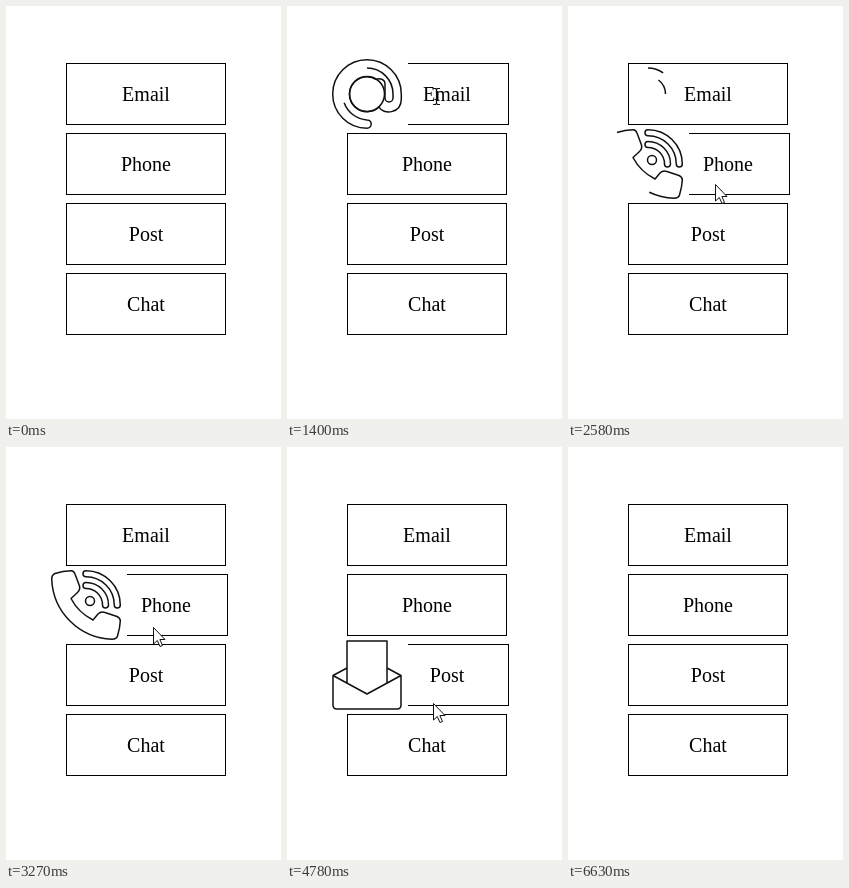
Recreate the animation shown at these times as an HTML page. Size 275x413 px, loop 6.83 s.

```html
<!DOCTYPE html>
<html lang="en">
<head>
<meta charset="utf-8">
<title>Contact buttons</title>
<style>
  html, body { margin: 0; width: 100%; height: 100%; overflow: hidden; background: #fff; }
  svg { display: block; width: 275px; height: 413px; }
  text { font: 20px "Liberation Serif", "Times New Roman", Times, serif; text-anchor: middle; }
  .frame { fill: none; stroke: #000; shape-rendering: crispEdges; }
  .icon { fill: none; stroke: #111; stroke-width: 1.5; stroke-linejoin: round; }
</style>
</head>
<body>
<svg id="stage" viewBox="0 0 275 413"></svg>
<script>
const LOOP = 6830;
const SLIDE = 500, DRAW_DELAY = 380, DRAW = 600;

// Each icon is a list of strokes in a 70 by 70 box.
const band = (outer, inner) => {
  const cap = (outer - inner) / 2;
  return `M35 ${35 - outer}A${outer} ${outer} 0 0 1 ${35 + outer} 35` +
    `a${cap} ${cap} 0 0 1 ${-2 * cap} 0A${inner} ${inner} 0 0 0 35 ${35 - inner}` +
    `a${cap} ${cap} 0 0 1 0 ${-2 * cap}`;
};

const rows = [
  { label: "Email", enter: 710, leave: 2010, undraw: 750, icon: [
    "M35 9A26 26 0 0 1 61 35V39a4 4 0 0 1-8 0V25c0-5-6-6-8.5-4.5A17.5 17.5 0 1 0 47 48" +
    "C51 56 69.3 55 69.3 40V35A34.3 34.3 0 1 0 35 69.3a4.2 4.2 0 0 0 0-8.4A26 26 0 0 1 35 9",
    "M52.5 35a17.5 17.5 0 1 0-35 0a17.5 17.5 0 1 0 35 0"] },
  { label: "Phone", enter: 2010, leave: 3360, undraw: 390, icon: [
    "M4 3.5Q12 .7 20 .7Q23 .7 24 4L28.5 16Q29.5 20 26 23L20 28.5C25 38 32 45 42 50" +
    "L47 44Q50 41 54 42.5L66 46.5Q69.3 48 69.3 51Q69 58 66.5 66Q65.5 69.3 61 69.3" +
    "C28 68 2 42 .7 9Q.7 5 4 3.5",
    band(34.3, 28.3), band(22.5, 16.5),
    "M43.5 31a4.5 4.5 0 1 0-9 0a4.5 4.5 0 1 0 9 0"] },
  { label: "Post", enter: 3360, leave: 4790, undraw: 500, icon: [
    "M15 28L1 35.5V65Q1 69 5 69H65Q69 69 69 65V35.5L35 54L1 35.5L15 28V43V1H55V43V28L69 35.5"] },
  { label: "Chat", enter: 4820, leave: 6070, undraw: 500, icon: [
    "M69.3 33C69.3 16 54 4.7 35 4.7S.7 16 .7 33C.7 40 3 45 7 49C6 55 0 58 1 65" +
    "C8 66 15 62 21 58.5C26 60.5 31 61.3 37 61.3C55 61 69.3 49 69.3 33"] }
];

// Pointer stops: time, x, y
const stops = [
  [720, 170, 106], [860, 149, 90], [1940, 149, 90], [2020, 149, 130], [2230, 147, 186],
  [2440, 147, 178], [3260, 147, 178], [3370, 147, 198], [3600, 146, 230], [4700, 146, 230],
  [4820, 146, 268], [5050, 146, 299], [5990, 146, 299], [6090, 164, 329], [6420, 250, 413]
];

const stage = document.getElementById("stage");
const add = (parent, name, attrs = {}) => {
  const node = document.createElementNS("http://www.w3.org/2000/svg", name);
  for (const key in attrs) node.setAttribute(key, attrs[key]);
  return parent.appendChild(node);
};
const clamp = v => Math.min(1, Math.max(0, v));

// cubic-bezier(.25, .1, .25, 1)
function ease(x) {
  if (x <= 0 || x >= 1) return clamp(x);
  const curve = (a, b, u) => 3 * a * u * (1 - u) ** 2 + 3 * b * u * u * (1 - u) + u ** 3;
  let lo = 0, hi = 1;
  for (let i = 0; i < 24; i++) {
    const mid = (lo + hi) / 2;
    if (curve(.25, .25, mid) < x) lo = mid; else hi = mid;
  }
  return curve(.1, 1, lo);
}

rows.forEach((row, i) => {
  const group = add(stage, "g", { transform: `translate(0 ${i * 70})` });
  row.side = add(group, "path", { class: "frame", d: "M60.5 57V119" });
  row.frame = add(group, "path", { class: "frame" });
  row.text = add(group, "text", { y: 95 });
  row.text.textContent = row.label;
  const icon = add(group, "g", { class: "icon", transform: "translate(45 53)" });
  row.strokes = row.icon.map(d => {
    const path = add(icon, "path", { d });
    return { path, length: path.getTotalLength() };
  });
  row.longest = Math.max(...row.strokes.map(s => s.length));
});

const beam = add(stage, "path", {
  d: "M-3.5-8H-1L0-7L1-8H3.5M0-7V7M-3.5 8H-1L0 7L1 8H3.5M-2 3H2",
  fill: "none", stroke: "#111", "stroke-width": 1.2
});
const arrow = add(stage, "path", {
  d: "M0 0V16.5L3.8 13L6.5 19L9 18L6.4 12H11.5Z", fill: "#fff", stroke: "#111"
});

function drawRow(row, t) {
  const open = ease((t - row.enter) / SLIDE) - ease((t - row.leave) / SLIDE);
  const left = Math.round(60 + 61 * open), right = 219.5 + Math.round(2 * open);
  row.frame.setAttribute("d", `M${left} 57.5H${right}V118.5H${left}`);
  row.side.setAttribute("opacity", 1 - open);
  row.text.setAttribute("x", 140 + 20 * open);

  const drawn = 1 - (1 - clamp((t - row.enter - DRAW_DELAY) / DRAW)) ** 3;
  const shown = drawn * (1 - ease((t - row.leave) / row.undraw)) * row.longest;
  for (const { path, length } of row.strokes) {
    path.style.display = shown > .3 ? "" : "none";
    path.style.strokeDasharray = shown >= length ? "none" : `${shown} 2000`;
  }
}

function drawPointer(t) {
  const next = stops.findIndex(s => s[0] > t);
  const visible = next > 0;
  let overText = false;
  if (visible) {
    const a = stops[next - 1], b = stops[next];
    const k = (t - a[0]) / (b[0] - a[0]);
    const x = a[1] + (b[1] - a[1]) * k, y = a[2] + (b[2] - a[2]) * k;
    overText = x < 186 && rows.some((_, i) => Math.abs(y - 89 - 70 * i) < 13);
    for (const node of [beam, arrow])
      node.setAttribute("transform", `translate(${Math.round(x) + .5} ${Math.round(y) + .5})`);
  }
  beam.style.display = visible && overText ? "" : "none";
  arrow.style.display = visible && !overText ? "" : "none";
}

const start = performance.now();
function tick() {
  const t = (performance.now() - start) % LOOP;
  rows.forEach(row => drawRow(row, t));
  drawPointer(t);
  requestAnimationFrame(tick);
}
tick();
</script>
</body>
</html>
```
